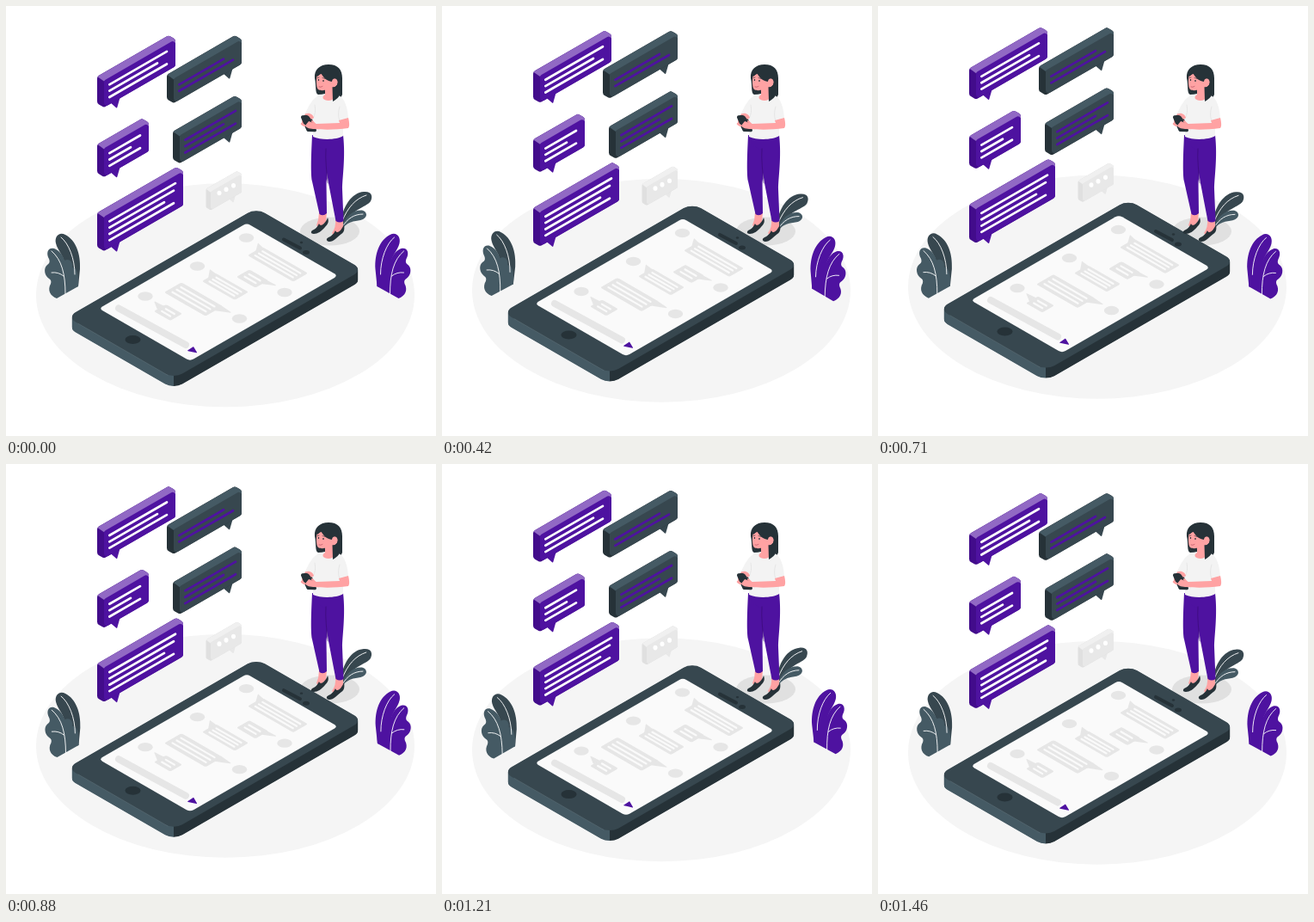
An HTML page with a canvas that plays this animation: 500x500 px, repeating every 1.5 s.

```html
<!DOCTYPE html>
<html lang="en">
<head>
<meta charset="utf-8">
<title>Chat scene</title>
<style>
html, body { margin: 0; width: 100%; height: 100%; overflow: hidden; background: #fff; }
canvas { display: block; width: 500px; height: 500px; }
</style>
</head>
<body>
<canvas id="stage"></canvas>
<script>
const LOOP = 1500, STEPS = 36, ISO = 0.577;
const canvas = document.getElementById('stage');
const scale = window.devicePixelRatio || 1;
canvas.width = canvas.height = 500 * scale;
const ctx = canvas.getContext('2d');

const PURPLE = '#4e12a0', SKIN = '#ffa2a3', INK = '#263238', SLATE = '#37474f', STEEL = '#455a64', GREY = '#e6e6e6';
const purple = { front: PURPLE, top: '#9169c4', side: '#420c8b', text: '#fff' };
const slate = { front: SLATE, top: STEEL, side: INK, text: PURPLE };
const pale = { front: '#e8e8e8', top: '#f0f0f0', side: '#e0e0e0' };

function shape(d, color) {
  ctx.fillStyle = color;
  ctx.fill(new Path2D(d));
}

function curve(d, color, width) {
  ctx.strokeStyle = color;
  ctx.lineWidth = width;
  ctx.lineCap = 'round';
  ctx.stroke(new Path2D(d));
}

function line(x1, y1, x2, y2, color, width) {
  curve(`M${x1} ${y1}L${x2} ${y2}`, color, width);
}

function oval(x, y, rx, ry, color) {
  ctx.fillStyle = color;
  ctx.beginPath();
  ctx.ellipse(x, y, rx, ry, 0, 0, Math.PI * 2);
  ctx.fill();
}

// Polygon with every corner rounded by the radius r.
function poly(points, color, r = 0) {
  const n = points.length, [a, b] = [points[n - 1], points[0]];
  ctx.beginPath();
  ctx.moveTo((a[0] + b[0]) / 2, (a[1] + b[1]) / 2);
  points.forEach((p, i) => ctx.arcTo(...p, ...points[(i + 1) % n], r));
  ctx.closePath();
  ctx.fillStyle = color;
  ctx.fill();
}

// Rounded rectangle lying on the floor; (x, y) is its left corner.
function plate(x, y, a, b, r, color) {
  const flat = new Path2D(), path = new Path2D();
  flat.roundRect(0, 0, a, b, r);
  path.addPath(flat, new DOMMatrix([1, ISO, 1, -ISO, x, y]));
  ctx.fillStyle = color;
  ctx.fill(path);
}

// (x, y) is the upper left corner of the front face; rows lists where the text lines end.
function bubble(x, y, w, h, depth, tail, paint, rows = []) {
  const rise = w * ISO, bx = x - depth, by = y - depth * ISO;
  const k = depth / 8, ty = y + h - (tail - x) * ISO;
  poly([[tail, ty - 2 * k], [tail + 8 * k, ty + 5 * k], [tail + 12 * k, ty - 9 * k]], paint.front, 0.8);

  ctx.save();
  poly([[bx, by], [x + w - depth, by - rise], [x + w, y - rise], [x + w, y - rise + h], [x, y + h], [bx, by + h]],
    paint.side, depth * 0.5);
  ctx.clip();
  poly([[bx, by], [x + w - depth, by - rise], [x + w, y - rise], [x + w, y - rise + 4], [x, y + 1]], paint.top);
  ctx.restore();
  poly([[x, y], [x + w, y - rise], [x + w, y - rise + h], [x, y + h]], paint.front, depth * 0.4);

  const left = x + 6.3, middle = y + h / 2 - 6.3 * ISO;
  rows.forEach((end, i) => {
    const rowY = middle + (i - (rows.length - 1) / 2) * 7.35;
    line(left, rowY, end, rowY - (end - left) * ISO, paint.text, 2.7);
  });
}

// Message on the phone screen.
function note(x, y, a, b, rows, tail) {
  const at = (u, v) => [x + u + v, y + (u - v) * ISO];
  plate(x, y, a, b, 2, GREY);
  poly(tail, GREY, 0.5);
  for (let i = 1; i <= rows; i++) {
    const v = b * i / (rows + 1);
    line(...at(4.5, v), ...at(a - 4.5, v), '#fafafa', 2.2);
  }
}

function phone() {
  const sides = ctx.createLinearGradient(0, 0, 500, 0), edge = 195 / 500;
  sides.addColorStop(0, STEEL);
  sides.addColorStop(edge, STEEL);
  sides.addColorStop(edge, INK);
  sides.addColorStop(1, INK);
  for (let dy = 12; dy > 0; dy -= 0.5) plate(71, 361.8 + dy, 124, 220, 10, sides);
  plate(71, 361.8, 124, 220, 10, SLATE);
  curve('M84 369.300L188 429.300', '#60727a', 0.5);
  plate(108, 351.7, 106, 172, 4, '#fafafa');
  oval(147.5, 388, 9, 5, INK);
  line(323, 271.500, 342, 281.500, INK, 4);
  oval(343.5, 275, 1.7, 1.2, INK);
  oval(349, 286.500, 4, 2.5, INK);

  for (const [x, y] of [[279.5, 269.5], [222.5, 302.5], [324, 333], [162, 337.5], [271.5, 363.5]]) {
    oval(x, y, 8.7, 5.2, GREY);
  }
  note(281, 290, 53, 17, 3, [[293, 275.5], [290, 286], [301, 283]]);
  note(228, 320, 38, 16, 3, [[237, 306], [235, 317], [245, 312]]);
  note(268, 315, 22, 15, 2, [[316, 325.5], [302, 318], [297, 323]]);
  note(184, 333, 48, 20, 3, [[263, 357], [250, 348], [242, 354]]);
  note(172, 355, 19, 14, 2, [[172, 343], [176, 353], [184, 349]]);
  line(131, 351.500, 209, 394, GREY, 8);
  poly([[210.5, 401], [218, 396], [222.5, 403.500]], PURPLE, 0.5);
}

function bubbles() {
  bubble(114, 86.6, 83, 31.4, 8, 121, purple, [187, 176, 187]);
  bubble(195, 84.4, 79, 28.6, 8, 252, slate, [253, 264]);
  bubble(114, 165.4, 52, 33.4, 8, 121, purple, [156, 145, 156]);
  bubble(202, 150.5, 72, 32.5, 8, 252, slate, [267, 253, 267]);
  bubble(114, 245, 92, 40, 8, 121, purple, [197, 195, 184, 195]);
  bubble(238, 215.8, 36, 21.7, 5.5, 259, pale);
  for (const [x, y] of [[248, 217.5], [256, 213.200], [264.5, 208.800]]) oval(x, y, 2.5, 2.8, '#fff');
}

function plant(back, front) {
  shape('M58 276C56 268 62 262 69 266C81 272 87 288 86 306L84 326L67 330L68 299C67 290 60 284 58 276Z', back);
  shape('M59 340C51 337 48 330 52 323C53 320 52 318 50 317C45 314 43 305 48 301C51 299 51 297 50 294' +
    'C46 287 49 280 56 282C62 284 66 290 68 296C74 293 78 298 77 304C82 304 85 311 84 326Z', front);
  curve('M64 269C73 276 80 294 80 312', '#fff', 0.9);
  curve('M53 285C65 295 69 312 69 335', '#fff', 0.9);
  curve('M53 310Q61 309 67 314', '#fff', 0.9);
}

function sidePlants() {
  plant(SLATE, STEEL);
  ctx.save();
  ctx.translate(515.5, 0);
  ctx.scale(-1, 1);
  plant(PURPLE, PURPLE);
  ctx.restore();
}

function smallPlant() {
  shape('M389 254C391 233 402 217 416 216C425 215 427 221 424 227C418 235 402 235 391 257Z', SLATE);
  shape('M389 260C394 244 404 237 414 237.500C420 239 421 245 415 248C408 251 400 248 391 259Z', STEEL);
  curve('M391 250C397 235 406 224 419 220', '#fff', 0.9);
  curve('M391 257C397 247 405 242 415 242', '#fff', 0.9);
}

function woman() {
  // Legs and shoes
  shape('M364 240L373 240L372 251L364 258L361 255Q364 248 364 240Z', SKIN);
  shape('M383 248H392V261L382 268L379 264Q384 257 383 248Z', SKIN);
  shape('M374 246C376 251 374 254 371 257C367 262 362 265 358 265C354 265 354 262 357 260.500C361 259 363 255 364 253C366 258 372 252 374 246Z', INK);
  shape('M393 254C394 260 393 263 390 265C385 269 381 274 376 274C372 273.500 372 270.500 375 269C380 267 382 263 383 261C385 266 390 261 393 254Z', INK);
  shape('M356 150C355 170 354 195 356 204L364.500 242Q369 245 373 241L372.500 205L377 170Z', PURPLE);
  shape('M356 150C366 155 384 155 392 150C395 176 391 200 391 213L392.500 250Q388 253 383.500 250L375 206C373 195 372 180 372 168L357 160Z', PURPLE);
  curve('M372 166C371 178 373 193 374 206', '#36096f', 0.6);

  // Hair and head
  shape('M359 84C358 74 365 68 375 68C386 68 391 74 391 84V103C389 108 386 111 380 111L378 102L363 103C359 102 361 92 359 84Z', INK);

  // Body
  shape('M349 124L357 128L349 138L344 139C343 133 346 128 349 124Z', SKIN);
  shape('M364 104C357 107 353 114 348 125L357 131V152C366 156 384 156 392 151V133L398 130C397 118 394 107 387 104L380 102H371Z', '#f3f3f3');
  curve('M359 115Q361 124 357 131M388 117Q385 126 388 134', '#e0e0e0', 0.7);
  shape('M371 94L380 92V103C384 105 381 110 375 110C369 110 366 106 371 103Z', SKIN);
  shape('M361.500 81C360.500 89 361 95 363 97C366 99 371 98 373 97C377 96 379 94 380 94C386 94 387 86 383 84.500C381 84 379 87 379 87L369 78Z', SKIN);
  shape('M360 82C360 72 367 69 375 69C386 69 390 75 390 84C389 96 393 104 380 111L379.500 94C382 95 386 93 385.500 88C384 83 380 84 379 88C373 87 368 83 366 77C365 80 363 82 360 82Z', INK);
  shape('M379.500 86C382 83 386 85 385.500 89C385 93 382 95 379 94Z', SKIN);
  oval(363.5, 86, 0.7, 1, INK);
  oval(369, 87, 0.8, 1, INK);
  curve('M362 83.500L364 83M368 83.500L371 84.500', INK, 0.6);
  curve('M364 94Q366 95 368 93.500', '#b95362', 0.7);

  // Arms and handset
  poly([[342, 127.500], [354, 126.500], [362, 146.500], [350, 146]], INK, 2);
  shape('M387 133L398 130C399 134 400 140 398 142C384 144 369 144 359 143C354 143 349 142 348 139L352 134L361 137L388 136Z', SKIN);
  shape('M348 126C352 123 357 126 358 130L355 132L352 128Z', SKIN);
  curve('M344 137L347 139', SKIN, 2.5);
  curve('M356 134L359 137', SKIN, 2);
}

function shifted(dy, draw) {
  ctx.save();
  ctx.translate(0, dy);
  draw();
  ctx.restore();
}

function swayed(angle, draw) {
  ctx.save();
  ctx.translate(250, 250);
  ctx.rotate(angle);
  ctx.translate(-250, -250);
  draw();
  ctx.restore();
}

function render(ms) {
  // The picture advances in 36 equal steps per loop.
  const p = Math.floor((ms + 2) * STEPS / LOOP) % STEPS / STEPS;
  const lift = -10 * (1 - Math.abs(1 - 2 * p));
  const degrees = p < 0.25 ? 4 * p : p < 0.75 ? 2 - 4 * p : 4 * p - 4;
  const angle = degrees * Math.PI / 180;

  ctx.setTransform(scale, 0, 0, scale, 0, 0);
  ctx.fillStyle = '#fff';
  ctx.fillRect(0, 0, 500, 500);
  shifted(lift, () => oval(255, 336.2, 220, 130, '#f5f5f5'));
  oval(376.5, 262, 34.5, 16.500, '#e0e0e0');
  swayed(angle, sidePlants);
  shifted(lift, () => { phone(); bubbles(); });
  swayed(angle, smallPlant);
  woman();
}

const start = performance.now();
function tick() {
  render((performance.now() - start) % LOOP);
  requestAnimationFrame(tick);
}
tick();
</script>
</body>
</html>
```
